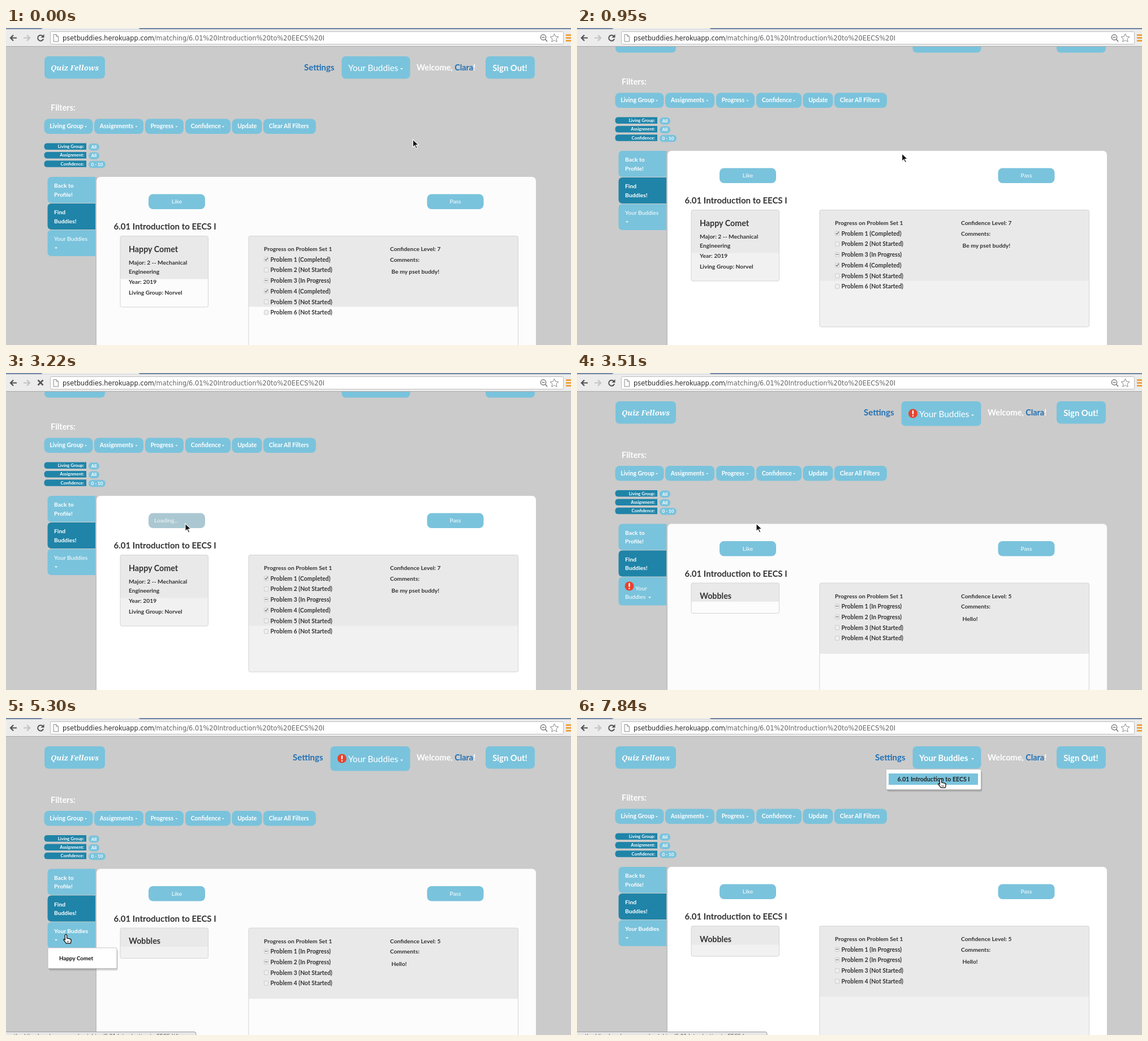
An HTML page that plays this animation: 999 by 560 pixels, repeating every 8000 ms.

```html
<!DOCTYPE html>
<html lang="en">
<head>
<meta charset="utf-8">
<title>Finding a study buddy</title>
<style>
  html, body { margin: 0; width: 100%; height: 100%; overflow: hidden; background: #cbcbcb; }
  svg { display: block; width: 100%; height: 100%; font-family: Lato, "Open Sans", sans-serif; }
  text { white-space: pre; }
  .url { font-family: "DejaVu Sans", sans-serif; }
  .script { font-family: "Noto Serif", serif; font-style: italic; }
</style>
</head>
<body>
<svg id="stage" viewBox="0 0 999 560"></svg>
<script>
const LOOP = 8000;
const SKY = '#7ac3dc', DEEP = '#1f84a8', LINK = '#2171b5', INK = '#333';
const COURSE = '6.01 Introduction to EECS I';
const BUDDY = 'Happy Comet';
const stage = document.getElementById('stage');

const rect = (x, y, w, h, r, fill, extra = '') =>
  `<rect x="${x}" y="${y}" width="${w}" height="${h}" rx="${r}" fill="${fill}" ${extra}/>`;
const path = (d, fill, extra = '') => `<path d="${d}" fill="${fill}" ${extra}/>`;
const line = (d, color, width) =>
  path(d, 'none', `stroke="${color}" stroke-width="${width}"`);
const text = (x, y, str, size = 10.3, fill = INK, extra = '') =>
  `<text x="${x}" y="${y}" font-size="${size}" font-weight="700" fill="${fill}" ${extra}>${str}</text>`;
const MIDDLE = 'text-anchor="middle"', END = 'text-anchor="end"', THIN = 'style="font-weight:400"';
const group = (dx, dy, body) => `<g transform="translate(${dx} ${dy})">${body}</g>`;
const caret = (x, y, s = 2.5) => path(`M${x} ${y}h${2 * s}l${-s} ${s}z`, '#fff');
const leftRound = (x, y, w, h, r, fill) =>
  path(`M${x + w} ${y}v${h}H${x + r}q${-r} 0 ${-r} ${-r}V${y + r}q0 ${-r} ${r} ${-r}z`, fill);
const alertIcon = (x, y) => `<circle cx="${x}" cy="${y}" r="8" fill="#e8432f"/>` +
  rect(x - 1.2, y - 5.5, 2.4, 7, 1, '#fff') + rect(x - 1.2, y + 3, 2.4, 2.4, 1.2, '#fff');
const shadowBox = (x, y, w, h) =>
  rect(x + 2, y + 4, w, h, 3, '#000', 'opacity=".1"') +
  rect(x + 1, y + 2, w, h, 2, '#000', 'opacity=".12"') +
  rect(x, y, w, h, 2, '#fff', 'stroke="#b5b5b5" stroke-width=".8"');

// Progress in equal held steps between two times.
const stepped = (t, from, to, n) =>
  Math.max(0, Math.min(1, Math.floor((t - from) / (to - from) * n + 1e-6) / n));
const mix = (a, b, p) => a.map((v, i) => v + (b[i] - v) * p);

const profiles = {
  first: {
    name: BUDDY, height: 126, split: 76, level: 7, comment: 'Be my pset buddy!',
    about: [[418, 'Major: 2 -- Mechanical'], [433.5, 'Engineering'], [452, 'Year: 2019'],
            [470.5, 'Living Group: Norvel']],
    problems: 'cnpcnn'
  },
  second: {
    name: 'Wobbles', height: 54, split: 33, level: 5, comment: 'Hello!', about: [], problems: 'ppnn'
  }
};
const STATUS = { c: 'Completed', n: 'Not Started', p: 'In Progress' };

function header(s) {
  const left = s.alert ? 573.5 : 593.5, tall = s.alert ? 43.5 : 39.5, drop = s.alert ? 2.5 : 0;
  return rect(68, 50, 107, 39.5, 7, SKY) +
    text(121.5, 75, 'Quiz Fellows', 13.2, '#fff', MIDDLE + ' class="script"') +
    text(left - 66.5, 74.5, 'Settings', 15, LINK) +
    rect(left, 50, 714.5 - left, tall, 7, SKY) + (s.alert ? alertIcon(594, 71.5) : '') +
    text(605, 75.5 + drop, 'Your Buddies', s.menu ? 14.8 : 15.4, '#fff', s.menu ? '' : THIN) +
    caret(697, 71 + drop) +
    text(726, 74.5, `Welcome, <tspan fill="${LINK}">Clara</tspan>!`, 14.4, '#fff') +
    rect(848, 50, 87, 39.5, 7, SKY) + text(891, 75.5, 'Sign Out!', 14.8, '#fff', MIDDLE);
}

function filters() {
  const buttons = [[67.5, 86, 'Living Group', 139], [156, 87, 'Assignments', 228.5],
    [246, 68, 'Progress', 299.5], [317, 80, 'Confidence', 382], [399.5, 53, 'Update'],
    [455, 93, 'Clear All Filters']];
  const rows = [['Living Group:', 'All', 19], ['Assignment:', 'All', 19], ['Confidence:', '0 - 10', 30]];
  return text(79, 146, 'Filters:', 14.4, '#fff') +
    buttons.map(([x, w, label, c]) => rect(x, 160.5, w, 26.5, 8, SKY) +
      text(x + 9.7, 177, label, 10.5, '#fff') + (c ? caret(c, 173.5, 2) : '')).join('') +
    rows.map(([label, value, w], i) => group(0, i * 15.4,
      leftRound(67.5, 203.5, 74.5, 11.5, 5.5, DEEP) + text(138, 212, label, 7.8, '#fff', END) +
      rect(146, 204, w, 12.5, 6, SKY) +
      text(146 + w / 2, 213, value, 8, '#fff', MIDDLE))).join('');
}

function sidebar(s) {
  const tab = (y, h, fill) => leftRound(73.5, y, 84.5, h, 7, fill);
  const last = s.sideAlert
    ? tab(357, 50, SKY) + alertIcon(92.5, 373) +
      text(103, 380, 'Your', 10.3, '#fff', THIN) + text(85, 395.5, 'Buddies', 10.3, '#fff', THIN) +
      caret(126, 392)
    : tab(357, 46, SKY) +
      text(85, 376, 'Your Buddies', 10.3, '#fff', s.clicked ? '' : THIN) + caret(86, 387.5);
  return tab(263, 46, SKY) +
    text(85, 282, 'Back to', 10.3, '#fff') + text(85, 297.5, 'Profile!', 10.3, '#fff') +
    tab(310, 46, DEEP) +
    text(85, 329, 'Find', 10.3, '#fff') + text(85, 344.5, 'Buddies!', 10.3, '#fff') + last;
}

// Two-tone box with a thin border.
const well = (x, y, w, h, split, low) =>
  rect(x, y, w, h, 3, low) + rect(x, y, w, split, 2, '#e9e9e9') +
  rect(x, y, w, h, 3, 'none', 'stroke="#d4d4d4"');

function checkbox(x, y, state) {
  const mark = { c: 'M2 4l1.6 2L7 1.5', p: 'M1.8 4h4.6', n: '' }[state];
  return group(x, y, rect(.5, .5, 7.5, 7.5, 1.5, '#efefef', 'stroke="#cacaca"') + line(mark, '#777', 1.3));
}

function likeButton(s) {
  if (s.dots) return rect(252, 293.5, 100, 26.5, 8, '#abc8d2') +
    text(262, 310, 'Loading' + '.'.repeat(s.dots), 10.1, '#dfecf0');
  return rect(252, 293.5, 100, 26.5, 8, s.hover ? DEEP : SKY) +
    text(302, 310, 'Like', 10.4, '#fff', MIDDLE + (s.hover ? '' : ' ' + THIN));
}

function panel(s) {
  const p = profiles[s.page];
  return rect(158.5, 264, 2, 500, 0, '#bdbdbd') + rect(160, 263, 777, 500, 7, s.white) +
    rect(160, 280, 20, 480, 0, s.white) + likeButton(s) +
    rect(744.5, 293.5, 100, 26.5, 8, SKY) + text(794.5, 310, 'Pass', 10.4, '#fff', MIDDLE + ' ' + THIN) +
    text(190.5, 356, COURSE, 15) +
    well(202, 367.5, 155.5, p.height - .5, p.split, s.cardLow) +
    text(217, 395.5, p.name, 14.3) + p.about.map(([y, str]) => text(217, y, str)).join('') +
    well(429, 367.5, 476.5, 206.5, 125, s.low) +
    text(456, 394, 'Progress on Problem Set 1') +
    [...p.problems].map((state, i) => checkbox(456, 404.5 + i * 18.75, state) +
      text(467.5, 412.5 + i * 18.75, `Problem ${i + 1} (${STATUS[state]})`, 10.4)).join('') +
    text(679, 394, 'Confidence Level: ' + p.level) + text(679, 412.5, 'Comments:') +
    text(681.5, 434, p.comment);
}

function toolbar(loading) {
  const reload = loading
    ? line('M56.5 12.5l9 9m0-9l-9 9', '#555', 2.6)
    : line('M65 14.5a5 5 0 1 0 1 4.5', '#555', 2) + path('M67.5 11v6h-6z', '#555');
  const arrow = 'M6 0H-5M0-5L-5 0l5 5';
  return rect(0, 0, 999, 33, 0, '#ececec') + rect(0, 0, 999, 2, 0, '#7288a8') +
    path('M62 2l3-2h169l3 2z', '#ececec') + rect(0, 2, 999, 1, 0, '#d9d9d9') +
    rect(0, 32, 999, 1, 0, '#a9a9a9') +
    group(13, 17.5, line(arrow, '#505050', 2.2)) +
    `<g transform="translate(37 17.5) scale(-1 1)">${line(arrow, '#c3c3c3', 2.2)}</g>` + reload +
    rect(78.5, 6.5, 907, 22, 2, '#fff', 'stroke="#bdbdbd"') +
    path('M84 11.5h5l3.5 3.5v9H84zM89 11.5v3.5h3.5', '#fafafa', 'stroke="#8c8c8c"') +
    text(100, 22, 'psetbuddies.herokuapp.com<tspan fill="#666">/matching/6.01%20Introduction%20to%20EECS%20I</tspan>',
      11.4, '#2b2b2b', 'class="url" ' + THIN) +
    '<circle cx="950" cy="16.5" r="4.7" fill="none" stroke="#777" stroke-width="1.4"/>' +
    line('M947.5 16.5h5M953.5 20l3.5 4', '#777', 1.6) +
    path('M969.5 10l2.2 5 5.3.5-4 3.6 1.2 5.3-4.7-2.8-4.7 2.8 1.2-5.3-4-3.6 5.3-.5z', '#fff', 'stroke="#888"') +
    line('M990 12.5h9M990 17.5h9M990 22.5h9', '#f0941e', 2.6);
}

const tooltip = () => rect(221, 154.5, 123, 82, 0, '#0795c1') + path('M272 236h16l-8 8z', '#0795c1') +
  ['Click if you\'d want', 'to work with this', 'person!'].map((str, i) =>
    text(236.5, 183 + i * 17, str, 11, '#fff')).join('');

const statusBubble = hash =>
  rect(-4, 554.5, 340, 20, 3, '#e6e6e6', 'stroke="#9a9a9a"') +
  text(-2, 564.5, 'psetbuddies.herokuapp.com/matching/' + COURSE + hash, 9, '#555', 'class="url" ' + THIN);

function cursor([x, y], hand) {
  const shape = hand
    ? path('M-1.5 1c0-2 3-2 3 0v4.5l5 1c2 .4 2.3 1.5 2 3.5l-1 4h-7l-4-5c-1.2-2 .6-2.4 1.5-1.4l.5.6z',
        '#fff', 'stroke="#111" stroke-width="1.2"') + line('M2.3 10v2.5M4.5 10v2.5', '#111', .8)
    : path('M0 0v12.5l3-2.7 2.2 4.9 2-.9-2.2-4.8h4.2z', '#111', 'stroke="#fff"');
  return `<g transform="translate(${x} ${y}) scale(1.08)">${shape}</g>`;
}

function pointer(t) {
  if (t < 4550) {
    const p = stepped(t, 770, 1570, 5);
    return mix([719.5, 197], [317, 266], 1 - (1 - p) ** 2);
  }
  if (t < 6650) return mix([142, 356], [106, 383], stepped(t, 4550, 5000, 3));
  if (t < 7700) return mix([106, 383], [648, 79], stepped(t, 6500, 7250, 5));
  return t < 7840 ? [645, 101] : [643, 108];
}

function render(t) {
  const second = t >= 3510, menu = t >= 7400;
  const pale = t < 600 || (second && !menu);
  const s = {
    menu, page: second ? 'second' : 'first',
    alert: second && !menu, sideAlert: second && t < 5300, clicked: t >= 5300,
    hover: t >= 1410 && t < 2470,
    dots: t < 2470 || second ? 0 : t < 2770 ? 1 : t < 3220 ? 2 : 3,
    white: pale ? '#fcfcfc' : '#fff',
    low: pale ? '#fcfcfc' : '#f1f1f1',
    cardLow: t < 600 || (second && t < 4700) ? '#fcfcfc' : '#f1f1f1'
  };
  const scroll = second || t < 600 ? 0 : t < 770 ? 21.5 : 46;
  const shift = s.alert ? 3.5 : 0;
  const hand = s.hover || (t >= 4550 && t < 6650) || t >= 7250;

  return rect(0, 0, 999, 560, 0, '#cbcbcb') +
    group(0, -scroll, header(s) + group(0, shift, filters() + panel(s) + sidebar(s))) +
    toolbar(t >= 3220 && t < 3510) +
    (t >= 1570 && t < 2470 ? tooltip() : '') +
    (s.clicked && !menu ? shadowBox(74, 406, 122, 36.5) + text(94, 428, BUDDY, 9.9, '#111') : '') +
    (menu ? shadowBox(546.5, 90.5, 168, 36) +
      (t >= 7700 ? rect(551, 98, 158, 20, 0, SKY) : '') + text(566.5, 112, COURSE, 10.6, '#222') : '') +
    (t >= 4700 ? statusBubble(t < 7700 ? '/#' : '') : '') +
    cursor(pointer(t), hand);
}

const start = performance.now();
let shown = '';
function tick() {
  const picture = render((performance.now() - start) % LOOP);
  if (picture !== shown) stage.innerHTML = shown = picture;
  requestAnimationFrame(tick);
}
tick();
</script>
</body>
</html>
```
